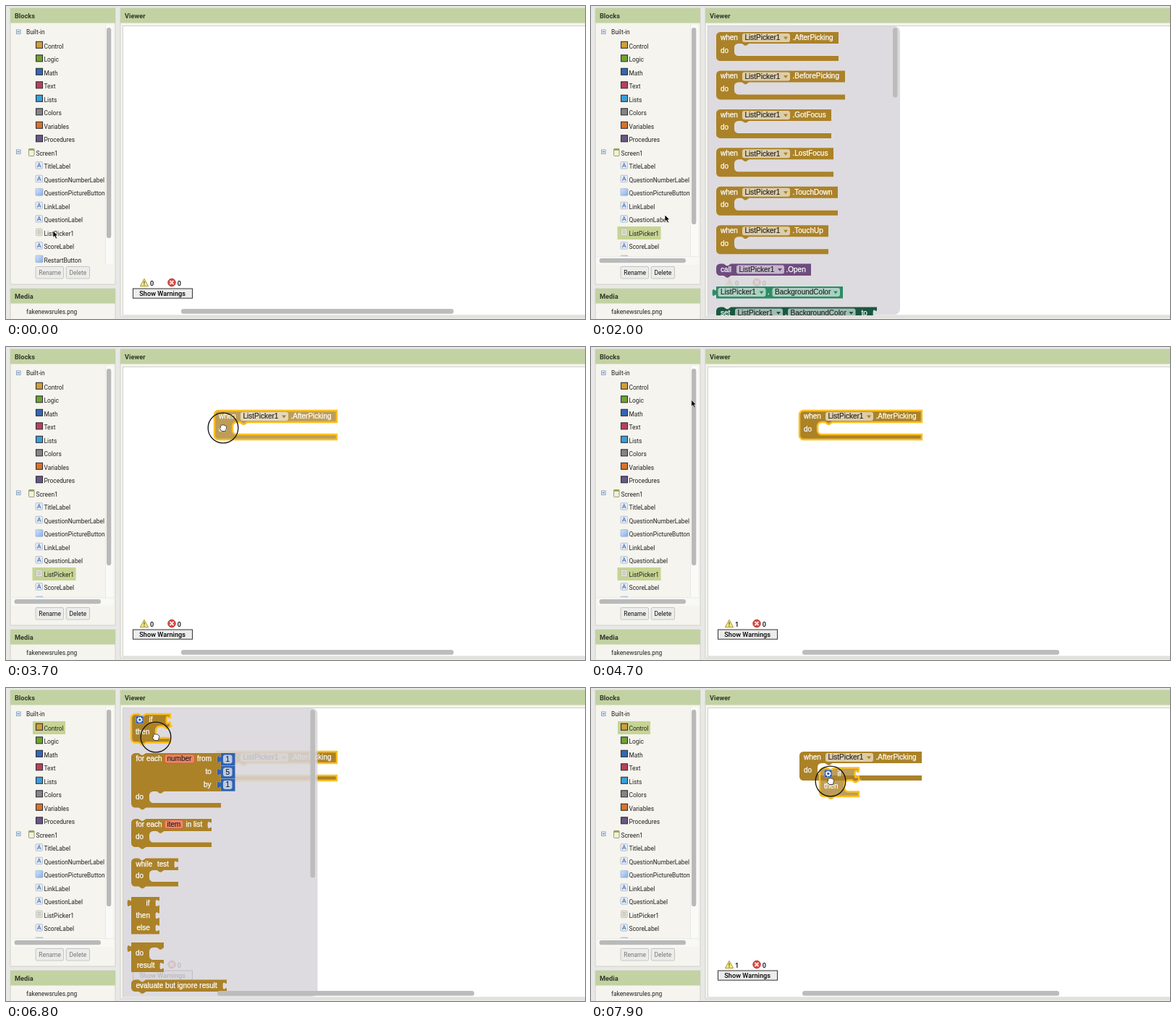
These frames come from a looping animation (800x433 px, 8000 ms). An HTML page:

```html
<!DOCTYPE html>
<html lang="en">
<head>
<meta charset="utf-8">
<title>Block editor</title>
<style>
html, body { margin: 0; width: 100%; height: 100%; overflow: hidden; background: #e8e8e7; }
svg { display: block; width: 100vw; height: 100vh; }
text { font: 8.4px Roboto, sans-serif; fill: #222; white-space: pre; }
.head { font-weight: 700; font-size: 9.2px; fill: #33382a; }
.strong { font-weight: 500; font-size: 9.2px; fill: #000; }
.white, .dark { font: 10px "Liberation Sans", Arial, sans-serif; }
.white { fill: #fff; stroke: #fff; stroke-width: .25; }
.dark { fill: #222; stroke: #222; stroke-width: .15; }
.rim { fill: #fff; fill-opacity: .3; }
.sel .rim, .drag .rim { display: none; }
.sel .shape { stroke: #fdbf20; stroke-width: 2.4; }
.drag .shape { fill-opacity: .78; }
</style>
</head>
<body>
<script>
const GOLD = '#ab8228', BLUE = '#2f62b3', R = 5.5;
const NOTCH = 'l4 2.7h2l4-2.7', NOTCH_BACK = 'l-4 2.7h-2l-4-2.7';
const TAB = 'v3.4c0 6.8-5.4-5.4-5.4 5.1s5.4-1.7 5.4 5.1';
const TAB_OUT = 'V13.6c0-6.8-5.4 5.4-5.4-5.1s5.4 1.7 5.4-5.1';

const text = (x, y, s, cls = '') => `<text x="${x}" y="${y}" class="${cls}">${s}</text>`;
const white = (x, y, s) => text(x, y, s, 'white');
const rect = (x, y, w, h, fill, more = '') =>
  `<rect x="${x}" y="${y}" width="${w}" height="${h}" fill="${fill}" ${more}/>`;
const group = (id, body) => `<g id="${id}">${body}</g>`;
const at = (x, y, body) => `<g transform="translate(${x} ${y})">${body}</g>`;

// Rows: '-' plain, 'v' value socket, 's' statement mouth starting at inner x.
function outline(w, rows, { out, prev, next }) {
  let y = 0;
  let d = out ? 'M0 0' : `M0 ${R}a${R} ${R} 0 0 1 ${R} ${-R}`;
  if (prev) d += 'H10.2' + NOTCH;
  d += `H${w}`;
  for (const [kind, h, inner] of rows) {
    y += h;
    if (kind === 'v') d += TAB;
    if (kind === 's') {
      d += `H${inner + 20.4}${NOTCH_BACK}H${inner + R}a${R} ${R} 0 0 0 ${-R} ${R}` +
        `V${y - R}a${R} ${R} 0 0 0 ${R} ${R}H${w}`;
    } else d += `V${y}`;
  }
  if (next) d += 'H20.4' + NOTCH_BACK;
  return d + (out ? 'H0' + TAB_OUT : `H${R}a${R} ${R} 0 0 1 ${-R} ${-R}`) + 'Z';
}
function block(fill, w, rows, links, body) {
  const d = outline(w, rows, links);
  return `<path class="rim" d="${d}" transform="translate(-.4 -.4)"/>` +
    `<path class="shape" fill="${fill}" d="${d}"/>${body}`;
}

const menu = (x, y, s, w, color) =>
  rect(x, y, w, 12, '#fff', 'opacity=".6" rx="3"') + text(x + 3.5, y + 9.2, s, 'dark') +
  `<path d="M${x + w - 9} ${y + 4.5}h6l-3 4z" fill="${color}"/>`;
const picker = (x, y, color) => menu(x, y, 'ListPicker1', 66, color);
const param = (x, y, s, w) =>
  rect(x, y, w, 12, '#ee8565', 'rx="3" stroke="#c9532f" stroke-width=".7"') + text(x + 3.5, y + 9.2, s, 'dark');

const STACK = { prev: 1, next: 1 };
const eventBlock = (name, w) => block(GOLD, w, [['-', 16], ['s', 17, 25], ['-', 7]], {},
  white(6, 11, 'when') + picker(36, 2, GOLD) + white(105.5, 11, '.' + name) + white(6, 28.5, 'do'));

const gear = rect(6.5, 2.8, 10.5, 10.5, '#2554a8', 'rx="2" stroke="#9db4dc" stroke-width=".6"') +
  '<circle cx="11.75" cy="8" r="2.4" fill="none" stroke="#fff" stroke-width="1.5"/>' +
  '<circle cx="11.75" cy="8" r="3.6" fill="none" stroke="#fff" stroke-width="1.1" stroke-dasharray="1.4 1.43"/>';
const ifBlock = block(GOLD, 54, [['v', 17], ['s', 16, 34], ['-', 6.5]], STACK,
  gear + white(24.5, 11, 'if') + white(6, 28, 'then'));

const numberBlock = n => block(BLUE, 19.5, [['-', 17.4]], { out: 1 },
  rect(3, 2.5, 12.5, 12, '#bccbe3', 'rx="3"') + text(6.5, 12, n, 'dark'));

const flyout = (id, right, barEnd, body) => group(id,
  `<g clip-path="url(#view)"><path d="M162 28H${right - 8}a8 8 0 0 1 8 8V419a8 8 0 0 1-8 8H162z" fill="#d8d6da" fill-opacity=".86"/>` +
  rect(right - 10, 30, 6.5, barEnd - 30, '#bcbcbc', 'rx="3.2"') + body + '</g>');

const events = [['AfterPicking', 169], ['BeforePicking', 178], ['GotFocus', 159],
  ['LostFocus', 162], ['TouchDown', 168], ['TouchUp', 155]];
const GREEN = '#2c8c66', DEEP = '#1a5740', PURPLE = '#6e4c7f';
const pickerFlyout = flyout('pickerFlyout', 427, 126.5,
  events.map(([name, w], i) => at(173, 36 + i * 53.45, group('event' + i, eventBlock(name, w)))).join('') +
  at(173, 356.5, block(PURPLE, 131, [['-', 16.5]], STACK,
    white(6, 11.5, 'call') + picker(28, 2, PURPLE) + white(96.5, 11.5, '.Open'))) +
  at(173, 388, block(GREEN, 175, [['-', 16.5]], { out: 1 },
    picker(2.5, 2, GREEN) + white(71, 11.3, '.') + menu(77.5, 2, 'BackgroundColor', 93.5, GREEN))) +
  at(173, 416.5, block(DEEP, 222, [['v', 17]], STACK,
    white(6, 11.3, 'set') + picker(26, 2, DEEP) + white(95, 11.3, '.') +
    menu(99, 2, 'BackgroundColor', 93.5, DEEP) + white(200.5, 11.3, 'to'))));

const controlFlyout = flyout('controlFlyout', 430.5, 262.5,
  at(173, 36, group('ifSource', ifBlock)) +
  at(173, 90, block(GOLD, 124, [['v', 17.7], ['v', 17.7], ['v', 17.6], ['s', 16, 25], ['-', 6.5]], STACK,
    white(6.5, 11, 'for each') + param(46, 2, 'number', 41.5) + white(91, 11, 'from') +
    white(102.5, 29, 'to') + white(100, 46.5, 'by') + white(6, 64, 'do')) +
    [1, 5, 1].map((n, i) => at(124, i * 17.7, numberBlock(n))).join('')) +
  at(173, 181, block(GOLD, 111, [['v', 17], ['s', 15.5, 25], ['-', 6.5]], STACK,
    white(6.5, 10.8, 'for each') + param(46, 1.5, 'item', 26) + white(75.5, 10.8, 'in list') + white(6, 28, 'do'))) +
  at(173, 235.5, block(GOLD, 65, [['v', 16.5], ['s', 16, 25], ['-', 6.5]], STACK,
    white(6.5, 11, 'while') + white(36, 11, 'test') + white(6, 27.5, 'do'))) +
  at(173, 289, block(GOLD, 39, [['v', 17.3], ['v', 17.3], ['v', 17]], { out: 1 },
    white(20.5, 11.5, 'if') + white(6.5, 28.8, 'then') + white(7.5, 46, 'else'))) +
  at(173, 352, block(GOLD, 45, [['-', 7], ['s', 17, 25], ['v', 17]], { out: 1 },
    white(6, 18, 'do') + white(8, 35, 'result'))) +
  at(173, 403.5, block(GOLD, 132, [['v', 16.5]], STACK, white(6.5, 11.5, 'evaluate but ignore result'))));

// Side tree
const rowY = i => 55.9 + i * 18.5;
const expander = y => rect(14.5, y, 5.5, 5.5, '#eef4fb', 'stroke="#7f9cc0" stroke-width=".9"') +
  rect(15.7, y + 2.3, 3.1, 1, '#35577f');
const drawers = [['Control', '#cf9f3a'], ['Logic', '#6fa32f'], ['Math', '#3367b4'], ['Text', '#b9405a'],
  ['Lists', '#3d9fd8'], ['Colors', '#858585'], ['Variables', '#d8742a'], ['Procedures', '#6c5587']];
const icons = {
  A: rect(.5, .5, 9.5, 9.5, '#e6ecf5', 'rx="1" stroke="#aab6c8" stroke-width=".8"') +
    '<path d="M2.8 8L5.2 2.5 7.7 8M3.6 6.3H6.9" fill="none" stroke="#5f83bd" stroke-width="1.1"/>',
  B: rect(.5, .5, 10, 9.5, 'url(#sky)', 'rx="1" stroke="#8fabd6" stroke-width=".7"'),
  L: rect(1, .5, 8.5, 9.5, '#ecece4', 'rx="1" stroke="#b3b3a8" stroke-width=".8"') +
    '<path d="M2.5 3h5.5M2.5 5.2h5.5M2.5 7.4h5.5" stroke="#aaa99b" stroke-width=".9"/>'
};
const parts = [['TitleLabel', 'A'], ['QuestionNumberLabel', 'A'], ['QuestionPictureButton', 'B'],
  ['LinkLabel', 'A'], ['QuestionLabel', 'A'], ['ListPicker1', 'L'], ['ScoreLabel', 'A'], ['RestartButton', 'B']];
const tree =
  group('controlRow', rect(37, 46, 45, 18, '#c6d493')) + group('pickerRow', rect(36.5, 305, 60, 18, '#c6d493')) +
  expander(33) + text(28, 39, 'Built-in') + expander(199) +
  rect(31.5, 197.5, 7.5, 10, '#f3f2d8', 'rx="1" stroke="#85846d" stroke-width=".8"') +
  rect(31.5, 197.5, 7.5, 2.3, '#8fa650') + text(41.5, rowY(8) + 3, 'Screen1') +
  drawers.map(([name, color], i) =>
    rect(41.5, rowY(i) - 6.6, 9, 9, color, 'stroke="#30313a" stroke-width="1.1"') + text(52.5, rowY(i) + 3, name)).join('') +
  parts.map(([name, icon], i) => at(40.5, rowY(i + 9) - 7.2, icons[icon]) + text(52.5, rowY(i + 9) + 3, name)).join('');

const panel = (x, y, w, h, title) =>
  rect(x, y, w, h, '#f5f4ee', 'stroke="#d2d2ca" stroke-width="1"') +
  rect(x, y, w, 20.5, '#c2d2a2') + text(x + 6, y + 13.6, title, 'head');
const button = (x, w, label) =>
  rect(x, 360.5, w, 16.5, '#ececea', 'rx="1.5" stroke="#c0c0bc" stroke-width=".9"') + text(x + 4.3, 371.7, label, 'button');

const warnings =
  '<path d="M191 377.3L196.7 387.7H185.3Z" fill="#f3e684" stroke="#a79a3c" stroke-width="1" stroke-linejoin="round"/>' +
  '<path d="M191 380.5v3.7M191 385.3v1.3" stroke="#5d5420" stroke-width="1.2"/>' +
  '<text id="count" x="199" y="386.5" class="strong">0</text>' +
  '<circle cx="229" cy="382.5" r="5.2" fill="#e0504b" stroke="#b02c29"/>' +
  '<path d="M226.5 380l5 5m0-5l-5 5" stroke="#fff" stroke-width="1.6"/>' + text(236.8, 386.5, '0', 'strong') +
  rect(175.5, 391, 82, 13.2, '#ececec', 'stroke="#333" stroke-width="1"') + text(184.3, 401, 'Show Warnings', 'strong');

const arrow = '<path d="M0 0V9.2L2.2 7.3 3.8 11 5.5 10.2 4 6.7H6.8Z" fill="#000" stroke="#fff" stroke-width=".7"/>';
const hand = '<path d="M-3.4-2.2C-3.6-4.3-1.6-4.5-1.2-3.6-.6-4.6 1-4.5 1.3-3.5 2.2-4.2 3.5-3.6 3.6-2.5 4.7-2.6 4.8-1.2 4.5.2' +
  'L3.3 4.5H-2L-4.4 1.2C-5-.2-4.2-.8-3.4-.4Z" fill="#fff" stroke="#222" stroke-width=".8"/>';

document.body.innerHTML = `<svg viewBox="0 0 800 433"><defs>
  <clipPath id="view"><rect x="162" y="28" width="638" height="400"/></clipPath>
  <clipPath id="side"><rect x="8" y="26" width="129" height="331"/></clipPath>
  <linearGradient id="sky" x2="1" y2="1"><stop stop-color="#d5e4f8"/><stop offset="1" stop-color="#86aee6"/></linearGradient>
  </defs>` +
  rect(0, 0, 800, 433, '#e8e8e7') +
  panel(6, 3, 145, 382, 'Blocks') + panel(6, 391, 145, 50, 'Media') + panel(158, 3, 660, 427, 'Viewer') +
  text(28, 426, 'fakenewsrules.png') +
  rect(137, 26, 11, 331, '#fafaf8') + rect(137, 26, .8, 331, '#e4e4df') +
  `<g clip-path="url(#side)">${tree}</g>` +
  '<rect id="sideBar" x="139" y="30" width="6.3" rx="3.1" fill="#b9b9b9"/>' +
  group('lowBar', rect(8, 346.5, 141, 11.5, '#f8f8f5') + rect(8, 346.5, 141, .7, '#e4e4df') +
    rect(11.5, 349, 119.5, 6.3, '#b9b9b9', 'rx="3.1"')) +
  button(41, 38.5, 'Rename') + button(83.2, 32.3, 'Delete') +
  rect(161.5, 27.5, 650, 400.5, '#fff', 'stroke="#d0d0cc" stroke-width="1"') + warnings +
  group('placed', eventBlock(...events[0])) + pickerFlyout + controlFlyout + group('placedIf', ifBlock) +
  '<rect id="viewBar" y="419" height="6.8" rx="3.4" fill="#bcbcbc"/>' +
  group('cursor', '<circle id="ring" fill="none" stroke="#111" stroke-width="1.3"/>' +
    group('arrow', arrow) + group('hand', hand)) + '</svg>';

const $ = id => document.getElementById(id);
const show = (id, on) => $(id).setAttribute('display', on ? 'inline' : 'none');
const move = (id, x, y) => $(id).setAttribute('transform', `translate(${x} ${y})`);
const set = (id, values) => { for (const k in values) $(id).setAttribute(k, values[k]); };

// time, x, y of the pointer
const path = [[0, 65, 311], [500, 66, 313], [1800, 66, 313], [2000, 102, 289], [2700, 185, 60], [3000, 185, 60],
  [3200, 246, 75], [3600, 300, 112], [4000, 300, 112], [5000, 69.5, 56.5], [5600, 69.5, 56.5],
  [6300, 188, 55], [6600, 188, 55], [6800, 207, 68], [7500, 318, 124], [7900, 331, 129], [8000, 331, 129]];
function pointer(t) {
  const i = path.findIndex(p => p[0] > t), [t0, x0, y0] = path[i - 1], [t1, x1, y1] = path[i];
  const k = (t - t0) / (t1 - t0);
  return [x0 + (x1 - x0) * k, y0 + (y1 - y0) * k];
}

const within = (t, a, b) => t >= a && t < b;

// The ring swells on press and shrinks on release.
const presses = [[700, 1000], [2900, 4000], [5100, 5400], [6500, 9000]];
function ringRadius(t) {
  const press = presses.find(([a, b]) => within(t, a, b));
  return press ? 20.8 * Math.min(1, (t - press[0] + 100) / 140, (press[1] - t) / 140) : 0;
}

function frame(now) {
  const t = Math.floor(now % 8000 / 100) * 100;
  const [x, y] = pointer(t);
  const picked = within(t, 900, 5200), open1 = within(t, 1000, 3300), open2 = within(t, 5200, 6900);
  const dropped = t >= 3900, dragIf = t >= 6900;

  show('pickerRow', picked);
  show('controlRow', t >= 5200);
  show('lowBar', t >= 900);
  set('sideBar', { height: t >= 900 ? 272 : 291 });
  document.querySelectorAll('.button').forEach(b => { b.style.fill = picked ? '#111' : '#777'; });

  show('pickerFlyout', open1);
  show('controlFlyout', open2);
  set('event0', { class: t >= 2900 ? 'sel' : '' });
  set('ifSource', { class: t >= 6500 ? 'sel' : '' });

  show('placed', t >= 3300);
  set('placed', { class: dragIf ? '' : dropped ? 'sel' : 'sel drag' });
  move('placed', dropped ? 288 : x - 12, dropped ? 88 : y - 24);
  show('placedIf', dragIf);
  set('placedIf', { class: 'sel drag' });
  move('placedIf', x - 15, y - 18.5);

  $('count').textContent = dropped ? 1 : 0;
  show('viewBar', !(within(t, 1000, 3100) || within(t, 5200, 6700)));
  set('viewBar', dropped ? { x: 292, width: 355 } : { x: 242, width: 376.5 });

  const overView = x > 165, radius = ringRadius(t);
  move('cursor', x, y);
  show('arrow', !overView);
  show('hand', overView);
  show('ring', radius > 0);
  set('ring', { r: radius });
  requestAnimationFrame(frame);
}
frame(performance.now());
</script>
</body>
</html>
```
